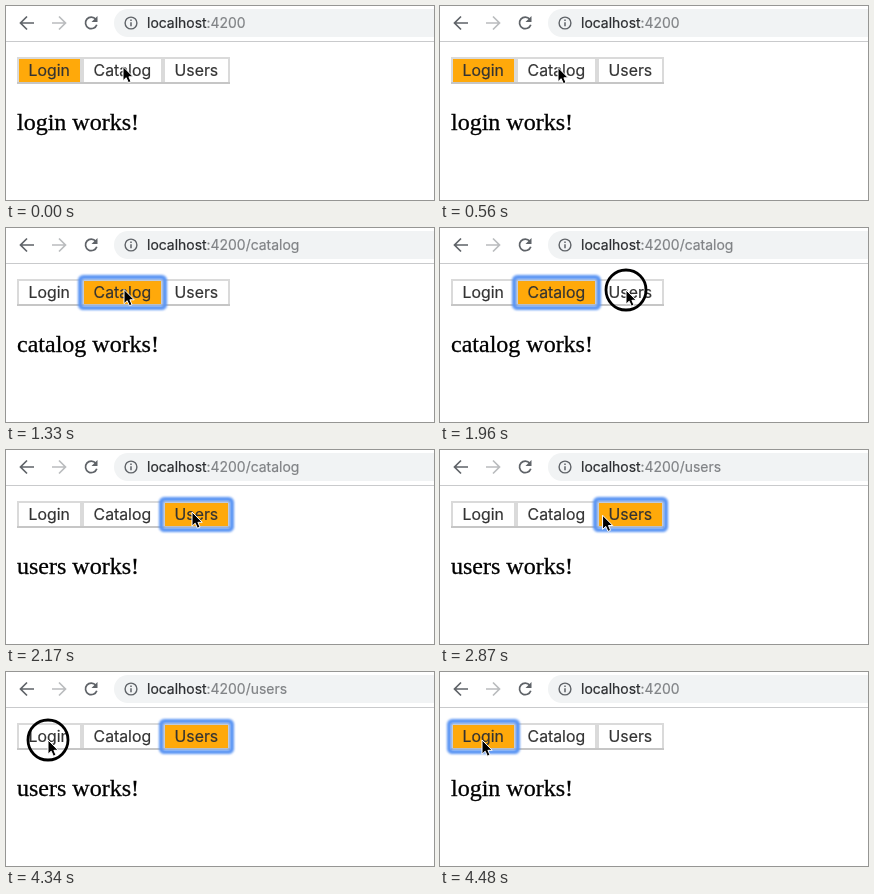
Animation of 428 by 194 pixels, one loop 4.55 s. Source, as an HTML page:

```html
<!DOCTYPE html>
<html lang="en">
<head>
<meta charset="utf-8">
<title>Tab navigation</title>
<style>
  html, body { margin: 0; width: 100%; height: 100%; overflow: hidden; background: #fff; }
  svg { display: block; width: 428px; height: 194px; }
  text { fill: currentColor; stroke: currentColor; stroke-width: .2; }
  .ui { font-family: Inter, Roboto, sans-serif; }
  .url { font-size: 13.95px; color: #2b2d30; }
  .dim { color: #808386; fill: currentColor; stroke: currentColor; }
  .tab text { font-size: 15.8px; color: #333; }
  .page { font: 24px "Liberation Serif", "Times New Roman", serif; color: #000; stroke-width: .3; }
  .icon { fill: none; stroke: #5f6368; stroke-width: 1.7; }
  #ring { fill: none; stroke: #5b95f3; stroke-width: 4.4; filter: blur(.8px); }
</style>
</head>
<body>
<svg viewBox="0 0 428 194">
  <rect width="428" height="194" fill="#fff"/>
  <rect x="108" y="3" width="360" height="28" rx="14" fill="#f1f3f4"/>
  <path d="M0 35.5H428" stroke="#c9cacc"/>
  <path class="icon" d="M28 17H15M21 10.5L14.5 17L21 23.5"/>
  <path class="icon" d="M46 17H59M53 10.5L59.5 17L53 23.5" style="stroke:#babcbe"/>
  <g transform="translate(3.5 0)">
    <path class="icon" d="M86.3 13.2A5.8 5.8 0 1 0 87.3 18.7"/>
    <path d="M88 10V16H82Z" fill="#5f6368"/>
  </g>
  <circle class="icon" cx="125" cy="17" r="5.9" style="stroke-width:1.4"/>
  <path d="M125 16.2V20.3M125 13.5V15" stroke="#5f6368" stroke-width="1.5"/>
  <text class="ui url" x="141" y="22">localhost<tspan class="dim">:4200<tspan id="path"></tspan></tspan></text>
  <g id="tabs" class="ui"></g>
  <rect id="ring" y="49.3" height="30.6" rx="3"/>
  <text id="page" class="page" x="11" y="124"></text>
  <circle id="click" r="20" fill="none" stroke="#000" stroke-width="2.8"/>
  <path id="cursor" d="M0 0V14.2L3.2 11.2L5.4 16.2L8 15.1L5.9 10.3H10.2Z"
        fill="#000" stroke="#fff" stroke-width="1" stroke-linejoin="round"/>
</svg>
<script>
const LOOP = 4550, STEP = 70;
const $ = id => document.getElementById(id);

const tabs = [
  { label: "Login", x: 11, w: 65 },
  { label: "Catalog", x: 76, w: 81 },
  { label: "Users", x: 157, w: 67 }
];

// Each row: start time, value
const active = [[0, 0], [770, 1], [2170, 2], [4480, 0]];
const focus = [[0, -1], [700, 1], [2030, 2], [4410, 0]];
const paths = [[0, ""], [840, "/catalog"], [2240, "/users"], [4480, ""]];
const pressed = [[0, 0], [630, 1], [770, 0], [1960, 1], [2170, 0], [4340, 1], [4480, 0]];

// Pointer stops: time, x, y, easing into the stop
const linear = p => p;
const smooth = p => p * p * (3 - 2 * p);
const speedUp = p => p ** 1.5;
const stops = [
  [0, 117, 60.5, linear], [140, 118, 61.5, linear],
  [1330, 118, 61.5, linear], [1820, 186, 62, smooth],
  [2660, 186, 62, linear], [3220, 84, 76, speedUp],
  [3290, 52, 72, linear], [3360, 42, 68, linear], [LOOP, 42, 68, linear]
];

const at = (rows, t) => rows.filter(r => r[0] <= t).pop()[1];

function pointer(t) {
  const i = stops.findIndex(s => s[0] > t);
  const [t0, x0, y0] = stops[i - 1], [t1, x1, y1, ease] = stops[i];
  const p = ease((t - t0) / (t1 - t0));
  return [x0 + (x1 - x0) * p, y0 + (y1 - y0) * p];
}

$("tabs").innerHTML = tabs.map(({ label, x, w }) => `
  <g class="tab">
    <rect x="${x + 1}" y="52" width="${w - 2}" height="25" fill="#fff" stroke="#dadada" stroke-width="2"/>
    <path d="M${x} 77H${x + w}" stroke="#c6c6c6" stroke-width="2"/>
    <text x="${x + 11.6}" y="70">${label}</text>
  </g>`).join("");
const faces = document.querySelectorAll(".tab rect");

function draw(t) {
  const on = at(active, t), ringed = at(focus, t);
  faces.forEach((face, i) => face.setAttribute("fill", i === on ? "#ffa90a" : "#fff"));
  $("page").textContent = tabs[on].label.toLowerCase() + " works!";
  $("path").textContent = at(paths, t);

  $("ring").style.display = ringed < 0 ? "none" : "";
  if (ringed >= 0) {
    $("ring").setAttribute("x", tabs[ringed].x - 1.8);
    $("ring").setAttribute("width", tabs[ringed].w + 3.6);
  }

  const place = `translate(${pointer(t)})`;
  $("cursor").setAttribute("transform", place);
  $("click").setAttribute("transform", place);
  $("click").style.display = at(pressed, t) ? "" : "none";
}

const begin = performance.now();
function tick() {
  const t = (performance.now() - begin) % LOOP;
  draw(Math.floor(t / STEP) * STEP);
  requestAnimationFrame(tick);
}
tick();
</script>
</body>
</html>
```
